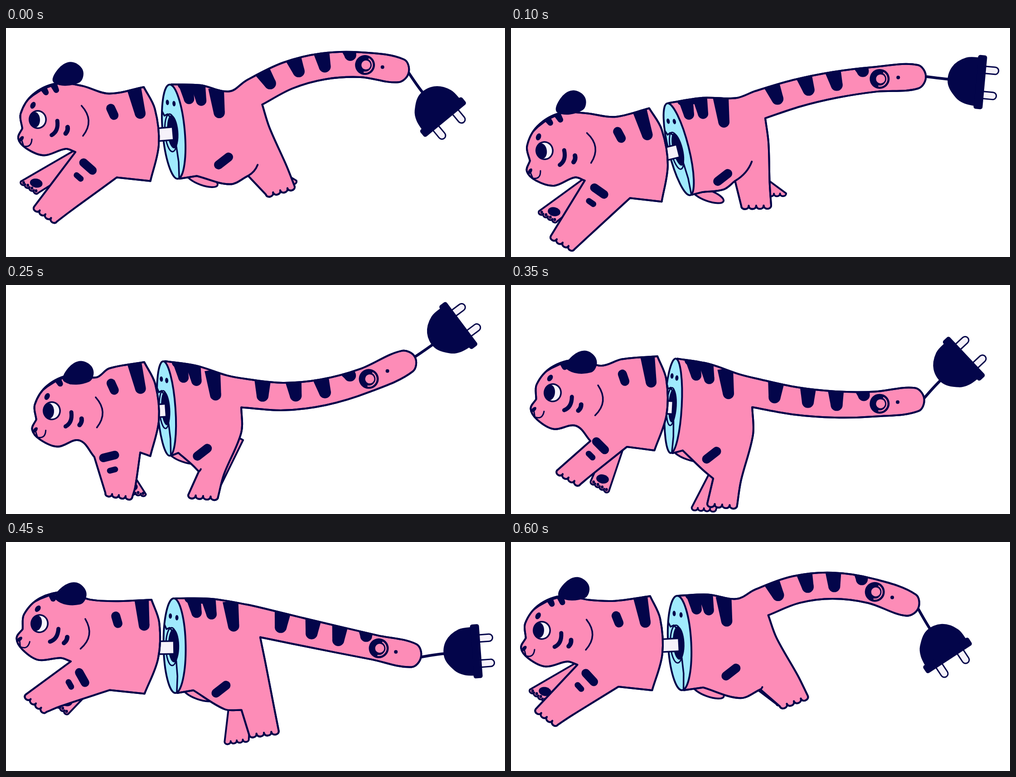
An HTML page with a canvas that plays this animation: 1101 by 508 pixels, repeating every 0.65 s.

```html
<!DOCTYPE html>
<html lang="en">
<head>
<meta charset="utf-8">
<title>Plug-in tiger</title>
<style>
html, body { margin: 0; width: 100%; height: 100%; overflow: hidden; background: #fff; }
canvas { display: block; }
</style>
</head>
<body>
<canvas id="stage" width="1101" height="508"></canvas>
<script>
const ctx = document.getElementById('stage').getContext('2d');
const INK = '#03054a', PINK = '#fd8cb7', BLUE = '#a0eafd', WHITE = '#f6f2fa';
const LOOP = 650, STEP = 50, DISC = 105;

// Joints of the gallop at seven moments; everything else follows from them.
const TIMES = [0, 100, 250, 350, 450, 500, 600];
const JOINTS = {
  eye: [[70, 203], [74, 272], [101, 279], [92, 239], [74, 181], [68, 181], [68, 196]],
  cut: [[304, 131], [305, 178], [305, 171], [323, 158], [321, 128], [318, 115], [307, 120]],
  disc: [[370, 230], [370, 269], [354, 274], [358, 268], [372, 230], [375, 211], [372, 224]],
  tilt: [[-5], [-14], [-4], [3], [-1], [-1], [-3]],
  root: [[548, 143], [550, 170], [525, 240], [540, 240], [568, 180], [562, 146], [553, 134]],
  mid: [[700, 85], [715, 126], [700, 238], [715, 265], [730, 216], [722, 148], [710, 97]],
  tip: [[872, 95], [898, 108], [885, 169], [895, 254], [900, 252], [882, 232], [882, 140]],
  swing: [[48], [5], [-35], [-41], [-4], [50], [54]],
  fore: [[87, 413], [114, 476], [249, 466], [127, 427], [66, 358], [56, 345], [79, 388]],
  hind: [[605, 360], [541, 394], [435, 468], [466, 487], [569, 423], [636, 340], [624, 353]]
};

const add = (a, x, y) => [a[0] + x, a[1] + y];
const mix = (a, b, u) => [a[0] + (b[0] - a[0]) * u, a[1] + (b[1] - a[1]) * u];
const corner = p => [p[0], p[1], 'corner'];
const toes = p => [p[0], p[1], 'toes'];
const wave = (t, peak) => Math.cos((t - peak) / LOOP * 2 * Math.PI);
const rad = deg => deg * Math.PI / 180;

function unit(a, b) {
  const x = b[0] - a[0], y = b[1] - a[1], l = Math.hypot(x, y) || 1;
  return [x / l, y / l, l];
}

// Returns a function from a turned local frame to the stage.
function frame(o, deg) {
  const c = Math.cos(rad(deg)), s = Math.sin(rad(deg));
  return (x, y) => [o[0] + x * c - y * s, o[1] + x * s + y * c];
}

// Cubic interpolation around the loop.
function track(keys, t) {
  const n = keys.length;
  let i = n - 1;
  while (TIMES[i] > t) i--;
  const key = k => keys[(k + n) % n];
  const when = k => TIMES[(k + n) % n] + Math.floor(k / n) * LOOP;
  const d = when(i + 1) - when(i), u = (t - when(i)) / d;
  return key(i).map((v, k) => {
    const end = key(i + 1)[k];
    const m0 = (end - key(i - 1)[k]) / (when(i + 1) - when(i - 1)) * d;
    const m1 = (key(i + 2)[k] - v) / (when(i + 2) - when(i)) * d;
    return v * (1 + 2 * u) * (1 - u) ** 2 + m0 * u * (1 - u) ** 2
      + end * u * u * (3 - 2 * u) + m1 * u * u * (u - 1);
  });
}

// Smooth closed outline; marked points are corners or start a row of toes.
function outline(p) {
  const path = new Path2D(), n = p.length;
  const tangent = (k, straight) => p[k][2] ? straight : unit(p[(k + n - 1) % n], p[(k + 1) % n]);
  path.moveTo(p[0][0], p[0][1]);
  p.forEach((a, i) => {
    const j = (i + 1) % n, b = p[j], dir = unit(a, b), [dx, dy, len] = dir;
    if (a[2] === 'toes') {
      const w = len / 4, h = w * .6;
      for (let k = 0; k < 4; k++) {
        const x = a[0] + dx * w * k, y = a[1] + dy * w * k;
        path.bezierCurveTo(x + dy * h, y - dx * h,
          x + dx * w + dy * h, y + dy * w - dx * h, x + dx * w, y + dy * w);
      }
      return;
    }
    const u = tangent(i, dir), v = tangent(j, dir), l = len / 3;
    path.bezierCurveTo(a[0] + u[0] * l, a[1] + u[1] * l, b[0] - v[0] * l, b[1] - v[1] * l, b[0], b[1]);
  });
  path.closePath();
  return path;
}

function paint(path, fill, width = 4) {
  ctx.fillStyle = fill;
  ctx.fill(path);
  ctx.lineWidth = width;
  ctx.strokeStyle = INK;
  ctx.stroke(path);
}

function line(p, width, color = INK) {
  ctx.beginPath();
  p.forEach(q => ctx.lineTo(q[0], q[1]));
  ctx.lineWidth = width;
  ctx.strokeStyle = color;
  ctx.stroke();
}

function arc(a, ctrl, b, width) {
  ctx.beginPath();
  ctx.moveTo(a[0], a[1]);
  ctx.quadraticCurveTo(ctrl[0], ctrl[1], b[0], b[1]);
  ctx.lineWidth = width;
  ctx.strokeStyle = INK;
  ctx.stroke();
}

function oval(x, y, rx, ry = rx, fill = INK, turn = 0) {
  ctx.beginPath();
  ctx.ellipse(x, y, rx, ry, turn, 0, 7);
  ctx.fillStyle = fill;
  ctx.fill();
}

// Stripe that narrows from a to a round end at b.
function stripe(a, b, w) {
  const [dx, dy] = unit(a, b), wide = w * .62, slim = w * .44;
  oval(b[0], b[1], slim);
  ctx.beginPath();
  for (const [p, r] of [[a, wide], [b, slim], [b, -slim], [a, -wide]]) {
    ctx.lineTo(p[0] - dy * r, p[1] + dx * r);
  }
  ctx.fill();
}

function placed(o, deg, draw) {
  ctx.save();
  ctx.translate(o[0], o[1]);
  ctx.rotate(rad(deg));
  draw();
  ctx.restore();
}

function marked(body, draw) {
  paint(body, PINK);
  ctx.save();
  ctx.clip(body);
  draw();
  ctx.restore();
  paint(body, 'transparent');
}

// Toe line of a paw: right end, then left end.
function paw(o, deg, half) {
  const at = frame(o, deg);
  return [at(half, 0), at(-half, 0)];
}

function limb(from, foot, deg, half) {
  const [a, b] = paw(foot, deg, half), [dx, dy] = unit(from, foot), w = half * .8;
  const back = [from[0] + dy * w, from[1] - dx * w], front = [from[0] - dy * w, from[1] + dx * w];
  paint(outline([corner(back), toes(a), corner(b), corner(front)]), PINK);
}

// Tail: parabola through three joints; off is the distance below the spine.
function tailAt({ root, mid, tip }, s, off = 0) {
  const u = Math.max(s, 0);
  const axis = k => root[k] * (1 - u) * (1 - 2 * u) + 4 * mid[k] * u * (1 - u) + tip[k] * u * (2 * u - 1);
  const slope = k => root[k] * (4 * u - 3) + mid[k] * (4 - 8 * u) + tip[k] * (4 * u - 1);
  const [dx, dy] = unit([0, 0], [slope(0), slope(1)]), out = (s - u) * 345;
  return [axis(0) + dx * out - dy * off, axis(1) + dy * out + dx * off];
}
const girth = s => 32 - 6 * s;

function pose(t) {
  const j = { t };
  for (const name in JOINTS) j[name] = track(JOINTS[name], t);
  const { cut, fore, hind, disc, tilt, eye } = j;

  j.lean = .5 + 8.5 * wave(t, 447);
  j.turn = (j.lean - 3) * .7;
  j.head = frame(eye, j.lean);
  j.torso = frame(cut, j.turn);
  j.low = j.torso(0, 209);
  j.elbow = add(j.low, (fore[0] - j.low[0]) * .32, -8);
  j.chin = j.head(58, 68);
  const stance = Math.max(0, wave(t, 290));
  j.chest = add(j.chin, 22 + 12 * stance, 7 + 32 * stance);
  j.foreTilt = (cut[0] - fore[0]) * .155;

  j.hub = frame(disc, tilt[0]);
  j.reach = hind[0] - disc[0];
  j.hindTilt = 4 - Math.max(0, j.reach - 150) * .24;
  j.hip = add(disc, 150, 40);
  j.heelToe = paw(hind, j.hindTilt, 33);
  const [dx, dy] = unit(hind, j.hip);
  j.knee = add(j.heelToe[1], dx * 57, dy * 57);
  j.ringLow = j.hub(4, DISC);
  j.groin = add(j.ringLow, (j.knee[0] - j.ringLow[0]) * .25, -6);
  return j;
}

function drawPlug(j) {
  const end = tailAt(j, 1.045), deg = j.swing[0] * 1.05;
  const o = frame(j.tip, j.swing[0])(138, 0), at = frame(o, deg);
  arc(end, at(-86, 0), at(-66, 0), 6);
  placed(o, deg, () => {
    for (const y of [-28, 28]) {
      const prong = new Path2D();
      prong.roundRect(0, y - 8, 38, 16, 8);
      paint(prong, WHITE, 3);
    }
    paint(outline([corner([0, -53]), [-35, -50], [-64, -27], [-70, 8], [-50, 38], [-30, 49], corner([0, 53])]), INK, 3);
    const flange = new Path2D();
    flange.roundRect(-9, -59, 18, 118, 4);
    paint(flange, INK, 2);
  });
}

function drawHindFar(j) {
  const c = wave(j.t, 120);
  placed(add(j.groin, 12, 8), 20, () => {
    const flank = new Path2D();
    flank.ellipse(0, 0, 36, 12, 0, 0, 7);
    paint(flank, PINK);
  });
  limb(add(j.hip, 0, 20), add(j.hind, 50 * c - 10, -5 - 22 * c), j.hindTilt, 27);
}

function drawForeFar(j) {
  const c = wave(j.t, 370);
  const from = mix(j.chest, j.elbow, .15 + .55 * Math.max(0, c));
  const foot = add(j.fore, 15 + 55 * c, 42 * c - 22), deg = j.foreTilt;
  limb(from, foot, deg, 23);
  const [dx, dy] = unit(foot, from);
  oval(foot[0] + dx * 17, foot[1] + dy * 17, 14, 10, INK, .2);
  const at = frame(foot, deg);
  for (let k = -1.5; k < 2; k++) {
    const [x, y] = at(k * 11, -1);
    oval(x, y, 3, 3.5);
  }
}

function drawRear(j) {
  const top = j.hub(4, -DISC), base = tailAt(j, -.13, -girth(0));
  const back = u => add(mix(top, base, u), 0, -24 * u * (1 - u));
  const under = tailAt(j, 0, girth(0)), [heel, toe] = j.heelToe;
  const samples = [0, .25, .5, .75, 1];
  const belly = mix(j.groin, j.knee, .65);
  const body = outline([
    corner(top), back(.5), base,
    ...samples.map(s => tailAt(j, s, -girth(s))),
    tailAt(j, 1.045),
    ...samples.slice(1).reverse().map(s => tailAt(j, s, girth(s))),
    corner(under),
    add(mix(under, heel, .28), (200 - j.reach) * .12, 0), mix(under, heel, .75),
    toes(heel), corner(toe), corner(j.knee),
    add(belly, 0, j.reach * .13 - 12), corner(j.groin), corner(j.ringLow)
  ]);
  marked(body, () => {
    for (const [u, length, w] of [[.25, 33, 26], [.46, 35, 26], [.77, 55, 28]]) {
      const a = back(u);
      stripe(a, add(a, 7, length), w);
    }
    line([back(.2), back(.46)], 24);
    for (const [s, end] of [[.11, 0], [.32, -1], [.5, 1], [.67, -21]]) {
      stripe(tailAt(j, s, -38), tailAt(j, s + .01, end), 30);
    }
    const spot = add(mix(j.disc, j.hind, .5), (210 - j.reach) * .3, 0), at = frame(spot, -38);
    line([at(-14, 0), at(14, 0)], 20);
  });
  const fold = Math.max(0, wave(j.t, 100));
  arc(j.knee, add(j.knee, 27 * fold, -16 * fold), add(j.knee, 37 * fold, -43 * fold), 4);

  const [x, y] = tailAt(j, .775), [dx, dy] = tailAt(j, .885);
  oval(x, y, 22);
  oval(x + 2, y, 10, 10, PINK);
  ctx.beginPath();
  ctx.arc(x, y, 16, -1, 1.7);
  ctx.lineWidth = 2.5;
  ctx.strokeStyle = PINK;
  ctx.stroke();
  oval(dx, dy, 4);
}

function drawDisc(j) {
  const k = (8 + .28 * (j.disc[0] - (j.cut[0] + j.low[0]) / 2)) / 24;
  placed(j.disc, j.tilt[0], () => {
    const rim = new Path2D();
    rim.ellipse(0, 0, 24 * k, DISC, 0, 0, 7);
    paint(rim, BLUE);
    ctx.clip(rim);
    oval(-8 * k, -66, 3.5, 6);
    oval(6 * k, -62, 3.5, 6);
    line([[-24 * k, -54], [-17 * k, -37], [-10 * k, -40], [-4 * k, -32]], 3.5);
    ctx.beginPath();
    ctx.ellipse(-6 * k, 2, 13 * k, 42, 0, 0, 7);
    ctx.lineWidth = 3;
    ctx.stroke();
    oval(-2 * k, 0, 12 * k, 37);
    line([[3 * k, 34], [5 * k, 68], [3 * k, 104]], 3.5);
  });
  const at = frame(add(j.disc, -3, 4), j.tilt[0]);
  ctx.lineCap = 'butt';
  line([at(-45, 0), at(3, 0)], 32);
  line([at(-45, 0), at(0, 0)], 25, WHITE);
  ctx.lineCap = 'round';
}

function drawFace() {
  oval(0, 0, 20, 21);
  oval(0, 0, 16.5, 17.5, WHITE);
  oval(-6, 0, 11, 17);
  oval(-9, -32, 5.5, 8, INK, .5);
  oval(-38, 41, 4, 7, INK, .7);
  line([[-38, 42], [-34, 57]], 3);
  arc([-35, 57], [-17, 63], [-15, 43], 3);
  arc([43, 5], [45, 28], [29, 36], 9);
  arc([65, 20], [66, 28], [60, 34], 10);
  arc([98, -26], [126, 8], [98, 41], 3.5);
}

function drawFront(j) {
  const { head, torso, chest, elbow, fore } = j;
  const [heel, toe] = paw(fore, j.foreTilt, 30);
  const body = outline([
    corner(torso(0, 0)), torso(21, 50), torso(24, 130), corner(j.low),
    corner(elbow), add(mix(elbow, heel, .8), 3, -3), toes(heel), corner(toe),
    corner(chest), j.chin, head(10, 80), head(-28, 63), head(-45, 40), corner(head(-35, 18)),
    head(-37, -15), head(-8, -56), head(45, -78), head(101, -70), torso(-78, 9)
  ]);
  marked(body, () => {
    line([torso(-76, 42), torso(-70, 58)], 20);
    stripe(torso(-24, -12), torso(-12, 58), 27);
    const mid = add(mix(chest, elbow, .5), -18, 4), [dx, dy] = unit(mid, fore);
    const across = frame(mid, Math.atan2(dy, dx) * 180 / Math.PI - 90);
    line([across(-13, 0), across(13, 0)], 19);
    line([across(-6, 31), across(6, 31)], 13);
    placed(j.eye, j.lean, () => {
      line([[-26, -46], [-10, -58], [14, -72], [48, -82]], 13);
      stripe([12, -76], [21, -59], 14);
      stripe([36, -82], [44, -63], 14);
    });
  });
  const bob = wave(j.t, 50), at = frame(head(8 * bob - 8, 4 - 13 * bob), j.lean);
  paint(outline([at(42, -73), at(52, -101), at(80, -115), at(104, -97), at(95, -71)]), INK, 3);
  placed(j.eye, j.lean, drawFace);
}

function draw(t) {
  const j = pose(t);
  ctx.fillStyle = '#fff';
  ctx.fillRect(0, 0, 1101, 508);
  ctx.lineCap = ctx.lineJoin = 'round';
  for (const part of [drawPlug, drawHindFar, drawRear, drawForeFar, drawDisc, drawFront]) part(j);
}

let shown = 0;
const start = performance.now();
function tick() {
  const t = Math.floor((performance.now() - start) % LOOP / STEP) * STEP;
  if (t !== shown) draw(shown = t);
  requestAnimationFrame(tick);
}
draw(shown);
requestAnimationFrame(tick);
</script>
</body>
</html>
```
